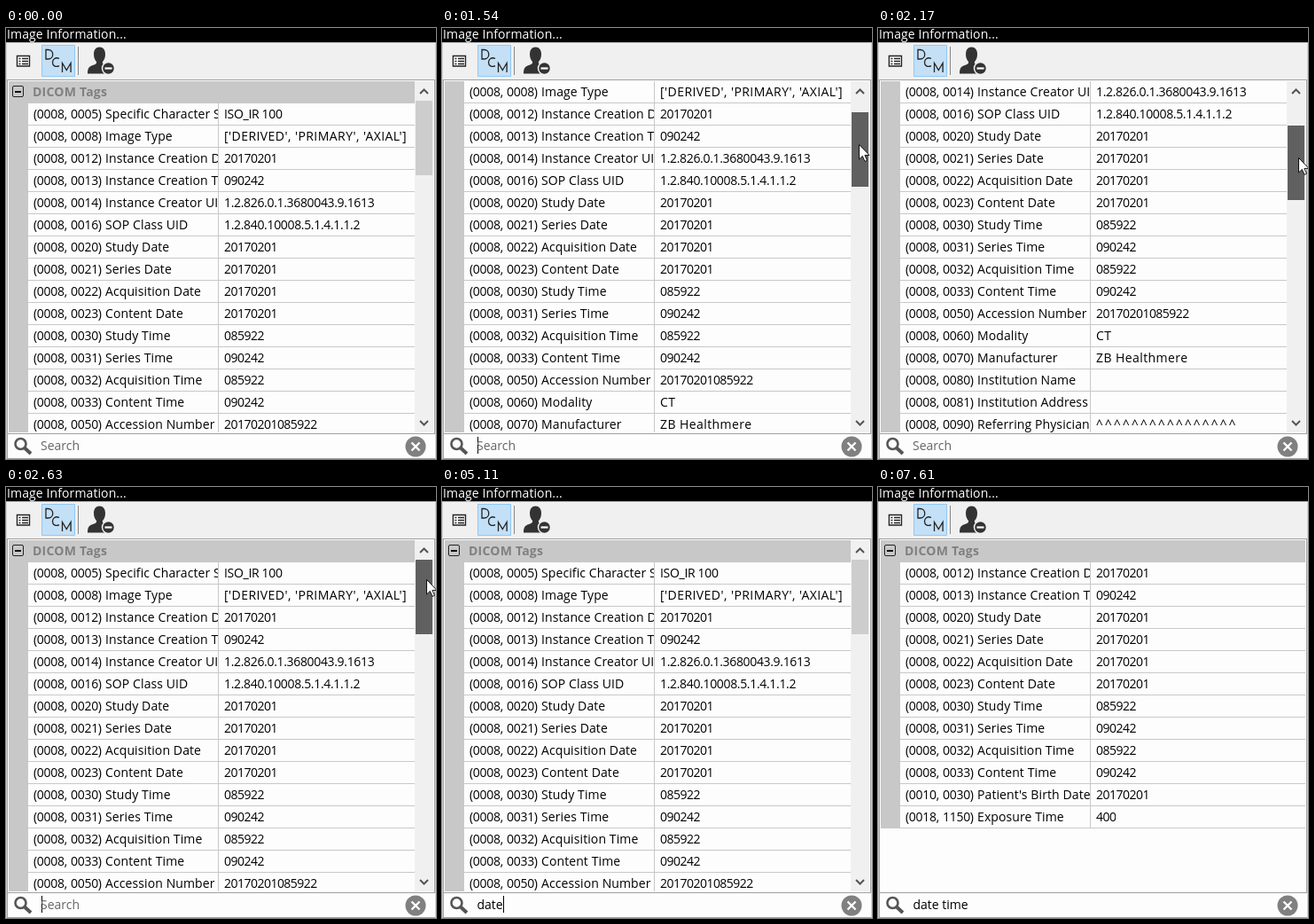
An HTML page for the animation above (8000 ms loop, 485 by 486 pixels).

```html
<!DOCTYPE html>
<html lang="en">
<head>
<meta charset="utf-8">
<title>Image Information</title>
<style>
html, body { margin: 0; width: 100%; height: 100%; overflow: hidden; }
#stage {
  position: relative; width: 485px; height: 486px; overflow: hidden;
  background: #f0f0f0; color: #000;
  font: 14px/24px "Open Sans", "Noto Sans", sans-serif; white-space: pre;
}
#stage > *, #art, #bar > *, #field { position: absolute; }
#title {
  left: 0; top: 0; width: 484px; height: 16px; padding-left: 1px;
  border-bottom: 1px solid #bbb;
  background: #000; color: #fff; line-height: 13px; letter-spacing: .1px;
}
#panel {
  left: 1px; top: 58px; width: 481px; height: 398px;
  border: 1px solid #a0a0a0; background: #fdfdfd;
}
#view { left: 3px; top: 60px; width: 479px; height: 396px; overflow: hidden; }
.head, .row { position: relative; height: 24px; border-bottom: 1px solid #c8c8c8; }
.head {
  background: #c8c8c8; color: #808080; font-weight: 700;
  padding-left: 27px; letter-spacing: .22px;
}
.head i {
  position: absolute; left: 3.5px; top: 5px; width: 11px; height: 11px;
  border: 1px solid #222; border-radius: 2px;
}
.head i::after {
  content: ""; position: absolute; left: 2px; top: 5px;
  width: 7px; height: 1.5px; background: #111;
}
.row { border-left: 22px solid #c8c8c8; }
.row > * { position: absolute; top: 0; height: 24px; overflow: hidden; }
.tag { left: 6px; letter-spacing: -.3px; word-spacing: .9px; }
.name { left: 87px; width: 127px; letter-spacing: .1px; }
.value { left: 214px; padding-left: 6px; border-left: 1px solid #c8c8c8; letter-spacing: .43px; }
.digits { letter-spacing: -.52px; }
.code { letter-spacing: -.34px; }
.carets { letter-spacing: 2.4px; }
#bar { left: 461px; top: 60px; width: 21px; height: 396px; background: #f0f0f0; }
#thumb { left: 1px; top: 22px; width: 19px; height: 84px; }
#search { left: 1px; top: 457px; width: 482px; height: 27px; border: 1px solid #a0a0a0; background: #fdfdfd; }
#field { left: 37.5px; top: 1px; }
#hint { left: 39px; top: 459px; color: #666; }
#caret { display: inline-block; width: 1.4px; height: 19px; margin-right: -2px; vertical-align: -4px; background: #000; }
svg { left: 0; top: 0; overflow: visible; }
</style>
</head>
<body>
<div id="stage">
  <div id="title">Image Information...</div>
  <div id="panel"></div>
  <div id="view"><div id="list"></div></div>
  <div id="bar">
    <div id="thumb"></div>
    <svg width="21" height="396" fill="none" stroke="#555" stroke-width="2">
      <path d="M6 14l4.500-4.500 4.500 4.500M6 383l4.500 4.500 4.500-4.500"/>
    </svg>
  </div>
  <div id="search"><span id="field"><span id="typed"></span><span id="caret"></span></span></div>
  <div id="hint">Search</div>
  <svg id="art" width="485" height="486" fill="none">
    <path d="M.5 17V486M484.500 17V486" stroke="#d0d0d0"/>
    <path d="M12.500 31.500h14v11.500h-14z" fill="#fff" stroke="#222" stroke-width="1.400"/>
    <path d="M14.500 34.500h2m1.500 0h7m-10.500 3h2m1.500 0h7m-10.500 3h2m1.500 0h7" stroke="#222" stroke-width="1.500"/>
    <path d="M40.500 19.500h37v35h-37z" fill="#c4e0f6" stroke="#90c8f6"/>
    <path d="M45 24.500v10.500h2.500c7 0 7-10.500 0-10.500zM60 34.500c-4-2-7.500.5-7.500 4.200s3.500 6 7.500 4M63.500 50v-10.500l4.800 8 4.800-8v10.500" stroke="#222" stroke-width="1.300"/>
    <path d="M81.500 21v32" stroke="#888"/>
    <g fill="#333">
      <path d="M92 51.500c0-6 1.500-8 6-9.500 3.500-1.200 4.500-2 4-4-2-2-3-5-3-8.500 0-5 2.500-8 6.500-8s6.500 3 6.500 8c0 3.500-1 6.500-3 8.500-.5 2 .5 3 4 4l3 9.500z"/>
      <circle cx="115.500" cy="45.500" r="7" stroke="#f0f0f0" stroke-width="1.500"/>
    </g>
    <path d="M111.500 45.500h8" stroke="#fff" stroke-width="2.200"/>
    <circle cx="16.500" cy="469" r="6" stroke="#555" stroke-width="2.600"/>
    <path d="M21 473.500l7 6.500" stroke="#555" stroke-width="4"/>
    <circle cx="462" cy="472" r="11.500" fill="#808080"/>
    <path d="M457.500 467.500l9 9m0-9l-9 9" stroke="#fff" stroke-width="2.400"/>
  </svg>
  <svg id="beam" width="485" height="486" fill="none" stroke="#111" stroke-width="1.300">
    <path d="M272.500 469h2.200l.8.800.8-.8h2.200M275.500 469.500v12M272.500 482h2.200l.8-.8.8.8h2.200"/>
  </svg>
  <svg id="arrow" width="13" height="20">
    <path d="M.5.500v16.500l3.800-3.600 2.600 6 2.600-1.100-2.600-5.900h5.100z" fill="#fff" stroke="#111"/>
  </svg>
</div>
<script>
const LOOP = 8000, ROW = 25;
const TICK = 76;            // pointer sampling, ms
const BLINK = 510;          // caret half period, ms
const GRAB = 118;           // pointer y where the thumb is gripped
const ROW_DRAG = 5.4;       // thumb travel per scrolled row
const PRESS = 760, RELEASE = 2800, CLICK = 3500, FOCUS = 4100;

const [list, bar, thumb, typed, caret, hint, beam, arrow] =
  ["list", "bar", "thumb", "typed", "caret", "hint", "beam", "arrow"]
    .map(id => document.getElementById(id));

const tags = `0008, 0005|Specific Character Set|ISO_IR 100
0008, 0008|Image Type|['DERIVED', 'PRIMARY', 'AXIAL']
0008, 0012|Instance Creation Date|20170201
0008, 0013|Instance Creation Time|090242
0008, 0014|Instance Creator UID|1.2.826.0.1.3680043.9.1613
0008, 0016|SOP Class UID|1.2.840.10008.5.1.4.1.1.2
0008, 0020|Study Date|20170201
0008, 0021|Series Date|20170201
0008, 0022|Acquisition Date|20170201
0008, 0023|Content Date|20170201
0008, 0030|Study Time|085922
0008, 0031|Series Time|090242
0008, 0032|Acquisition Time|085922
0008, 0033|Content Time|090242
0008, 0050|Accession Number|20170201085922
0008, 0060|Modality|CT
0008, 0070|Manufacturer|ZB Healthmere
0008, 0080|Institution Name|
0008, 0081|Institution Address|
0008, 0090|Referring Physician's Name|${"^".repeat(16)}
0010, 0030|Patient's Birth Date|20170201
0018, 1150|Exposure Time|400`.split("\n").map(line => line.split("|"));

// Straight pointer moves; the pointer rests at the end or leaves.
const moves = [
  { start: 70, end: 230, from: [469, 380], to: [458, 248], leaves: true },
  { start: 610, end: PRESS, from: [473, 130], to: [470, GRAB] },
  { start: 1470, end: 1770, from: [470, 126], to: [470, 147] },
  { start: 2170, end: 2630, from: [474, 146], to: [474, 104] },
  { start: 2870, end: 3330, from: [474, 104], to: [275, 465], leaves: true },
];

// Bursts of typing with an even gap between keys.
const bursts = [
  { text: "date", start: 4410, gap: 233 },
  { text: " ", start: 6280, gap: 0 },
  { text: "time", start: 6830, gap: 77 },
];
const keys = bursts.flatMap(b => [...b.text].map((_, i) => b.start + i * b.gap));
const text = bursts.map(b => b.text).join("");
const nudges = [CLICK, 4960, 5430];   // mouse moves that bring the beam back

const last = (times, t) => Math.max(0, ...times.filter(s => s <= t));
const show = (el, on) => { el.style.visibility = on ? "visible" : "hidden"; };

function pointerAt(t) {
  const move = moves.findLast(m => m.start <= t);
  if (!move || (move.leaves && t >= move.end)) return null;
  const { start, end, from, to } = move;
  const passed = Math.floor((t - start + 10) / TICK) * TICK;
  const p = Math.min(1, passed / (end - start));
  return from.map((v, i) => Math.round(v + (to[i] - v) * p));
}

function caretAt(t) {
  const since = t - last([1470, FOCUS, ...keys], t);
  const clicking = t >= CLICK && t < FOCUS;
  return t >= 1470 && !clicking && Math.floor(since / BLINK) % 2 === 0;
}

// The list is filtered a moment after a burst ends.
const queryAt = t => bursts
  .filter(b => b.start + b.gap * (b.text.length - 1) + 350 <= t)
  .map(b => b.text).join("").trim();

function valueClass(v) {
  if (/^\d+$/.test(v)) return "digits";
  if (/\d/.test(v)) return "code";
  return v[0] === "^" ? "carets" : "";
}

const rowHtml = ([tag, name, value]) =>
  `<div class="row"><span class="tag">(${tag})</span><span class="name">${name}</span>` +
  `<span class="value ${valueClass(value)}">${value}</span></div>`;

let shown;
function fill(query) {
  if (query === shown) return;
  shown = query;
  const words = query.split(" ");
  const rows = tags.filter(([, name]) => words.some(w => name.toLowerCase().includes(w)));
  list.innerHTML = '<div class="head"><i></i>DICOM Tags</div>' + rows.map(rowHtml).join("");
  show(bar, !query);
}

function draw() {
  const t = performance.now() % LOOP;
  const pointer = pointerAt(t);
  const pressed = t >= PRESS && t < RELEASE;
  const hover = t >= moves[1].start && t < PRESS;
  const offset = pressed ? Math.max(0, pointer[1] - GRAB) : 0;

  fill(queryAt(t));
  list.style.transform = `translateY(${-ROW * Math.floor(offset / ROW_DRAG)}px)`;
  thumb.style.transform = `translateY(${offset}px)`;
  thumb.style.background = pressed ? "#606060" : hover ? "#a6a6a6" : "#cdcdcd";

  show(arrow, pointer);
  if (pointer) arrow.style.transform = `translate(${pointer[0]}px, ${pointer[1]}px)`;
  show(beam, t >= CLICK && last(nudges, t) >= last(keys, t));
  show(caret, caretAt(t));
  show(hint, t < 3640);
  typed.textContent = text.slice(0, keys.filter(k => k <= t).length);
  requestAnimationFrame(draw);
}
draw();
</script>
</body>
</html>
```
